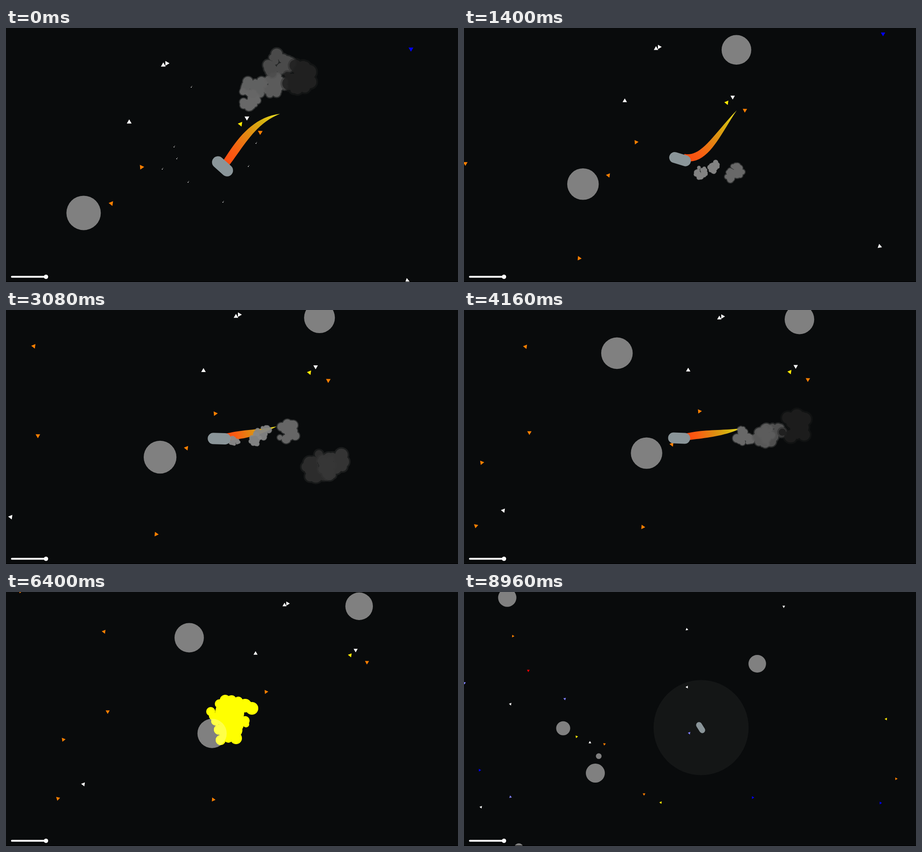
An HTML page with a canvas that plays this animation: 998 by 561 pixels, repeating every 9.06 s.

```html
<!DOCTYPE html>
<html lang="en">
<head>
<meta charset="utf-8">
<title>Small ship in space</title>
<style>
  html, body { margin: 0; width: 100%; height: 100%; overflow: hidden; background: #090b0c; }
  canvas { display: block; width: 100vw; height: 100vh; }
</style>
</head>
<body>
<canvas id="stage" width="998" height="561"></canvas>
<script>
const ctx = document.getElementById('stage').getContext('2d');
const W = 998, H = 561, CX = 499, CY = 280;
const LOOP = 9060, CRASH = 105, RESPAWN = 172, LAST = 192;
const WHITE = '#fff', ORANGE = '#ff8000', YELLOW = '#ffeb04', BLUE = '#00f', VIOLET = '#8080ff', RED = '#f00';
const random = n => { const v = Math.sin(n * 12.9898) * 43758.5453; return v - Math.floor(v); };

// tick, camera x, camera y, zoom
const cameraKeys = [
  [0, 744, 197.3, 1.176], [30, 684.6, 246.4, 1.078], [66, 607.2, 266.3, 1.12],
  [88, 554.7, 272.9, 1.074], [105, 518, 277.5, 1.04], [120, 500.5, 279.8, 1.008], [136, 499, 280, 1]
];

// tick, ship x, ship y, angle, then the flame's four Bezier points relative to the ship
const shipKeys = [
  [0, 726.2, 219, 42, 6, -5, 31.5, -41, 57, -86, 108, -98.6],
  [30, 664.2, 255.4, 17, 7.4, -3.7, 49, 5.6, 72.4, -45.5, 116, -100],
  [66, 582, 270, 1.5, 12.5, -2.7, 48, -9, 75, -10.7, 113, -24],
  [88, 532.4, 275.7, 2, 14, -2.3, 46.5, -9, 88.5, -9, 126.6, -20],
  [105, 496, 280, 4, 14, -2.3, 46.5, -6, 88.5, -12, 124, -15]
];

// x, y, heading in degrees
const oldTriangles = [
  [WHITE, [[551, 136, -90], [615, 29, -90], [621.5, 25.5, 0], [772, 128, 90], [171, 424.5, 188], [1073, 434, -100]]],
  [YELLOW, [[760, 139.5, 188]]],
  [ORANGE, [[797, 155, 92], [574, 220.5, -5], [517.5, 288.5, 188], [457.5, 458.5, 5], [216.5, 87.5, 188],
    [224.5, 264, 90], [126.5, 326, -8], [114.5, 456, 102], [32, -2, -8]]],
  [BLUE, [[1080, -1.5, 90]]]
];
const newTriangles = [
  [WHITE, [[492, 82.5, -100], [706, 32, 90], [102.5, 247.5, 188], [278, 332.5, -90], [37.5, 475, 190], [492.5, 210, 180]]],
  [ORANGE, [[108, 97.5, 5], [310, 336, 100], [397.5, 446.5, 90], [954, 412.5, 0]]],
  [RED, [[142, 173.5, 90]]],
  [VIOLET, [[1, 201, 100], [222.5, 236, 80], [102.5, 452.5, -100], [497.5, 311.5, 190]]],
  [YELLOW, [[248.5, 319.5, -130], [434.5, 465, 185], [932, 280.5, 185]]],
  [BLUE, [[34.5, 393.5, 0], [637.5, 454, 0], [919.5, 466, 0]]]
];
const newPlanets = [
  [95.5, 12.5, 20.2], [219, 301, 15.5], [297.5, 362.5, 6.3],
  [290, 400, 21], [647.5, 158.5, 19.4], [121, 565, 10]
];

// tick, age at that tick, x, y, velocity
const puffs = [
  [0, 25, 776, 92, 1, -2], [0, 28, 786, 71, 1, -2], [0, 30, 824, 68, .6, -2], [0, 36, 833, 28, .6, -1.4],
  [0, 47, 868, 52, 1, -1.5],
  [30, 8, 707, 283, 2, 1.2], [30, 6, 732, 271, 2, 1.3], [30, 25, 776, 287, 1.8, 1],
  [66, 3, 613, 273.5, 2.5, -.1], [66, 12, 669, 257, 2.5, .4], [66, 9, 655, 271, 2.5, 0],
  [66, 26, 716, 257, 2.4, -.2]
];

// x, y, radius of the fully grown fireball
const fireball = [
  [494, 266, 32], [505, 305, 17], [498, 288, 28], [508, 323, 13], [474, 327, 11], [491, 323, 10],
  [470, 304, 11], [463, 285, 10], [452, 264, 10], [471, 247, 10], [484, 239, 12], [498, 239, 11],
  [513, 241, 10], [528, 251, 15], [543, 257, 14], [528, 284, 10], [530, 292, 7], [483, 313, 12], [457, 274, 9]
];

// Smooth interpolation through unevenly spaced keys
function sample(keys, tick) {
  const end = keys.length - 1;
  if (tick >= keys[end][0]) return keys[end].slice(1);
  let k = 0;
  while (tick >= keys[k + 1][0]) k++;
  const a = keys[k], b = keys[k + 1], span = b[0] - a[0], u = (tick - a[0]) / span;
  const slope = (n, c) => {
    const p = keys[Math.max(0, n - 1)], q = keys[Math.min(end, n + 1)];
    return (q[c] - p[c]) / (q[0] - p[0]) * span;
  };
  return a.slice(1).map((v, j) => {
    const c = j + 1, m = slope(k, c), n = slope(k + 1, c), d = b[c] - v;
    return v + u * (m + u * (3 * d - 2 * m - n + u * (m + n - 2 * d)));
  });
}

function discs(list, color) {
  ctx.fillStyle = color;
  ctx.beginPath();
  for (const [x, y, r] of list) {
    ctx.moveTo(x + r, y);
    ctx.arc(x, y, r, 0, 2 * Math.PI);
  }
  ctx.fill();
}
const disc = (x, y, r, color) => discs([[x, y, r]], color);

function triangles(groups, radius) {
  for (const [color, list] of groups) {
    ctx.fillStyle = color;
    for (const [x, y, heading] of list) {
      ctx.beginPath();
      for (let n = 0; n < 3; n++) {
        const a = (heading + n * 120) * Math.PI / 180;
        ctx.lineTo(x + radius * Math.cos(a), y + radius * Math.sin(a));
      }
      ctx.fill();
    }
  }
}

function roundLine(x1, y1, x2, y2, width, color) {
  ctx.strokeStyle = color;
  ctx.lineWidth = width;
  ctx.lineCap = 'round';
  ctx.beginPath();
  ctx.moveTo(x1, y1);
  ctx.lineTo(x2, y2);
  ctx.stroke();
}

function capsule(x, y, angle, scale) {
  const a = angle * Math.PI / 180, dx = 11.5 * scale * Math.cos(a), dy = 11.5 * scale * Math.sin(a);
  roundLine(x - dx, y - dy, x + dx, y + dy, 22.4 * scale, '#8a9599');
}

function flame(shipX, shipY, p) {
  const left = [], right = [], steps = 20;
  for (let n = 0; n <= steps; n++) {
    const t = n / steps, v = 1 - t;
    const at = c => v * v * v * p[c] + 3 * v * v * t * p[c + 2] + 3 * v * t * t * p[c + 4] + t * t * t * p[c + 6];
    const along = c => v * v * (p[c + 2] - p[c]) + 2 * v * t * (p[c + 4] - p[c + 2]) + t * t * (p[c + 6] - p[c + 4]);
    const dx = along(0), dy = along(1), half = (7 + 13 * t) * v / Math.hypot(dx, dy);
    const x = shipX + at(0), y = shipY + at(1);
    left.push([x - dy * half, y + dx * half]);
    right.unshift([x + dy * half, y - dx * half]);
  }
  const fill = ctx.createLinearGradient(shipX + p[0], shipY + p[1], shipX + p[6], shipY + p[7]);
  [[0, '#ff4a10'], [.2, '#fa5c12'], [.5, '#e08a12'], [.75, '#d6b010'], [1, '#f0e424']].forEach(s => fill.addColorStop(...s));
  ctx.fillStyle = fill;
  ctx.beginPath();
  left.concat(right).forEach(q => ctx.lineTo(...q));
  ctx.fill();
}

function smoke(tick) {
  puffs.forEach(([at, ageAt, px, py, vx, vy], id) => {
    const since = tick - at, age = ageAt + since;
    if (age < 0 || age > 52) return;
    const x = px + vx * since, y = py + vy * since, r = 10 + age * .5;
    const shade = Math.round(10 + 130 * (1 - (age / 52) ** 2));
    const cloud = [];
    for (let n = 0; n < 22; n++) {
      const seed = id * 97 + n * 3 + 1;
      const a = random(seed) * 6.283 + age * .01, d = Math.sqrt(random(seed + 1)) * r * .8;
      cloud.push([x + d * Math.cos(a), y + d * Math.sin(a), r * (.16 + .24 * random(seed + 2))]);
    }
    const gray = alpha => `rgba(${shade},${shade},${shade},${alpha})`;
    discs(cloud.map(([cx, cy, cr]) => [cx, cy, cr + age * .07]), gray(.4));
    discs(cloud, gray(.9));
  });
}

function explosion(age, color) {
  const spread = 1 - (1 - Math.min(1, age / 31)) ** 2;
  const size = age < 31 ? .35 + .65 * spread : 1 - ((age - 31) / 25) ** 2;
  if (size <= 0) return;
  discs(fireball.map(([x, y, r]) => [497 + (x - 497) * spread, 280 + (y - 280) * spread, r * size]), color);
}

function specks(tick) {
  if (tick > 8) return;
  ctx.fillStyle = `rgba(255,255,255,${.9 * (1 - tick / 9)})`;
  for (const [x, y] of [[409, 130], [552, 254], [345, 311], [402, 340], [479, 384], [535, 305], [371, 262], [377, 288]]) {
    ctx.fillRect(x - 1, y, 2, 1.5);
    ctx.fillRect(x + 1, y - 2, 1, 1);
  }
}

function flightScene(tick) {
  const [camX, camY, zoom] = sample(cameraKeys, tick);
  const age = tick - CRASH, pushed = Math.max(0, age);
  const hit = [465.4 - pushed * .335, 306.5 + pushed * .19, 32.3];
  ctx.save();
  ctx.translate(CX, CY);
  ctx.scale(zoom, zoom);
  ctx.translate(-camX, -camY);
  disc(...hit, '#808080');
  if (tick >= 15) disc(779.7, 31.5, 30.4, '#808080');
  if (tick >= 77) disc(404.5, 101, 32.4, '#808080');
  triangles(oldTriangles, 5.2);
  if (age < 0) {
    const [x, y, angle, ...curve] = sample(shipKeys, tick);
    flame(x, y, curve);
    smoke(tick);
    capsule(x, y, angle, 1);
  } else {
    smoke(tick);
    const green = Math.min(255, 90 + age * 14);
    explosion(age, `rgb(255,${green},0)`);
    ctx.beginPath();
    ctx.arc(...hit, 0, 2 * Math.PI);
    ctx.clip();
    explosion(age, `rgb(255,${green},72)`);
  }
  ctx.restore();
  specks(tick);
}

// The camera catches up with the new ship, zooming out on the way
function respawnScene(tick) {
  const left = LAST - tick, lag = 1.11 ** left, zoom = 1 + .72 * (left / 20) ** 2;
  const shipX = 522.5, shipY = 299.5;
  ctx.save();
  ctx.translate(CX, CY);
  ctx.scale(zoom, zoom);
  ctx.translate(23.5 * lag - shipX, 19.5 * lag - shipY);
  disc(523.5, 299.5, 105, `rgba(255,255,255,${.042 + .002 * left})`);
  discs(newPlanets, '#808080');
  triangles(newTriangles, 3.4);
  capsule(shipX, shipY, 58, .58);
  ctx.restore();
}

function slider() {
  roundLine(13, 549.5, 86, 549.5, 4, WHITE);
  disc(88.3, 549.5, 4.8, WHITE);
}

// Ticks come in groups of three that last 100, 20 and 20 ms
function tickAt(ms) {
  const t = ms % LOOP, rest = t % 140;
  return 3 * Math.floor(t / 140) + (rest < 100 ? 0 : rest < 120 ? 1 : 2);
}

function draw(tick) {
  ctx.fillStyle = '#090b0c';
  ctx.fillRect(0, 0, W, H);
  if (tick < RESPAWN) flightScene(tick);
  else respawnScene(tick);
  slider();
  ctx.fillStyle = '#000';
  ctx.fillRect(0, 560, W, 1);
}

const start = performance.now();
let shown = -1;
function run() {
  const tick = tickAt(Math.max(0, performance.now() - start));
  if (tick !== shown) draw(shown = tick);
  requestAnimationFrame(run);
}
run();
</script>
</body>
</html>
```
